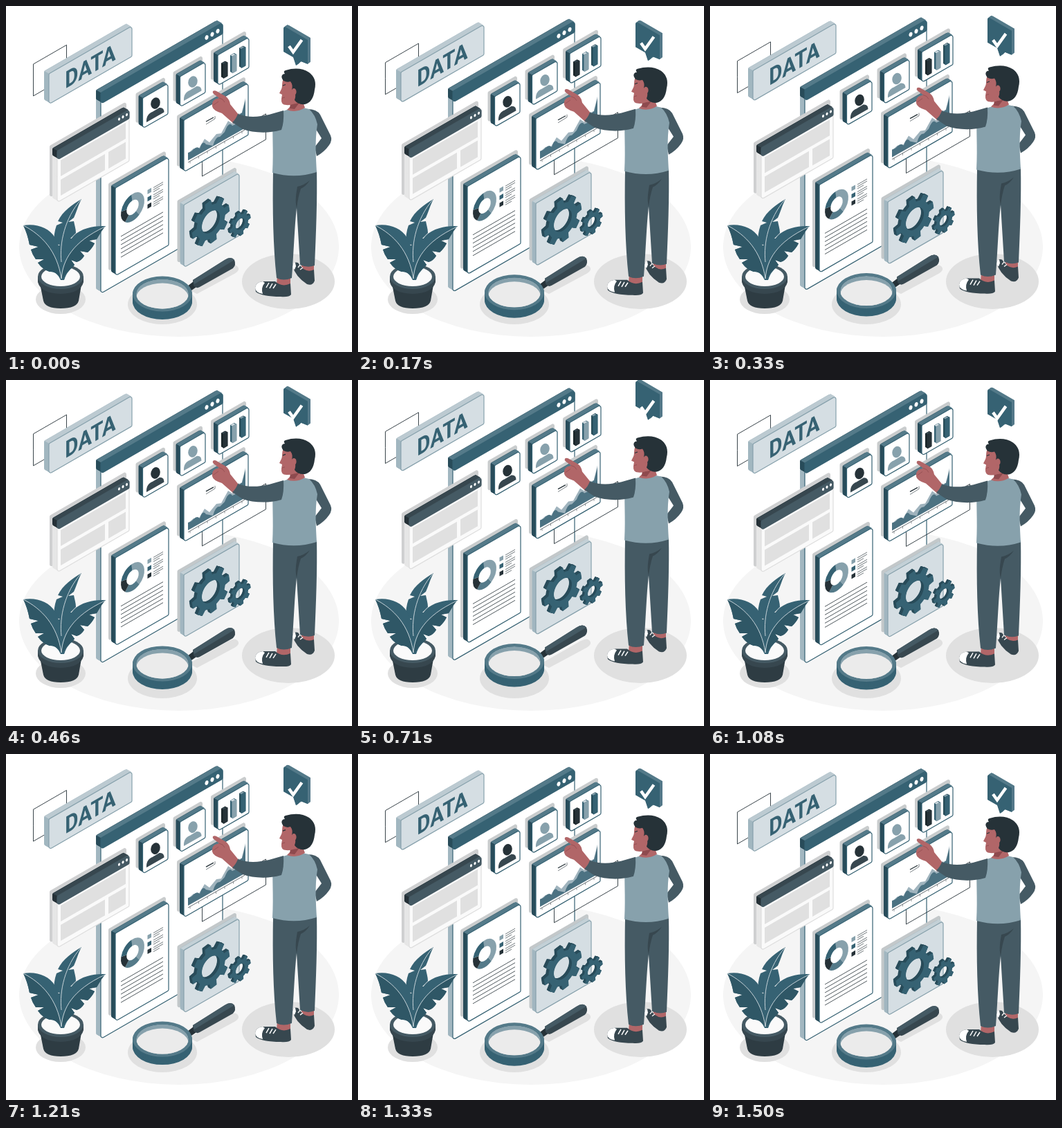
An HTML page with a canvas for the animation above (1.54 s loop, 500x500 px).

```html
<!DOCTYPE html>
<html lang="en">
<head>
<meta charset="utf-8">
<title>Data dashboard</title>
<style>
html, body { margin: 0; width: 100%; height: 100%; overflow: hidden; background: #fff; }
canvas { display: block; width: 100vw; height: 100vh; }
</style>
</head>
<body>
<canvas id="stage" width="500" height="500"></canvas>
<script>
const ctx = document.getElementById('stage').getContext('2d');
const SLOPE = 0.577;
const TEAL = '#366273', DEEP = '#294c5a', MID = '#547a89', SOFT = '#87a1ac', PALE = '#d5dee3';
const INK = '#263238', SLATE = '#37474f', STEEL = '#455a64', SKIN = '#b16668', SHADE = '#e0e0e0';

function fill(color, d) {
  ctx.fillStyle = color;
  ctx.fill(typeof d === 'string' ? new Path2D(d) : d, 'evenodd');
}
function line(color, width, d) {
  ctx.strokeStyle = color;
  ctx.lineWidth = width;
  ctx.stroke(typeof d === 'string' ? new Path2D(d) : d);
}
function oval(color, x, y, rx, ry, turn = 0) {
  ctx.fillStyle = color;
  ctx.beginPath();
  ctx.ellipse(x, y, rx, ry, turn, 0, Math.PI * 2);
  ctx.fill();
}
// Upright parallelogram rising to the right, with rounded corners
function quad(x, y, w, h, r = 0) {
  const path = new Path2D(), rise = w * SLOPE;
  const corners = [[x, y], [x + w, y - rise], [x + w, y - rise + h], [x, y + h]];
  path.moveTo(x, y + h / 2);
  corners.forEach((c, i) => path.arcTo(...c, ...corners[(i + 1) % 4], r));
  path.closePath();
  return path;
}
function lifted(dy, draw) {
  ctx.save();
  ctx.translate(0, dy);
  draw();
  ctx.restore();
}
// Solid made by sweeping a flat outline along (dx, dy)
function extrude(path, dx, dy, side, face) {
  const steps = 12;
  for (let i = steps; i > 0; i--) {
    ctx.save();
    ctx.translate(dx * i / steps, dy * i / steps);
    fill(side, path);
    ctx.restore();
  }
  fill(face, path);
}
function slab(x, y, w, h, d, look) {
  const k = d * SLOPE, r = Math.min(2.5, w / 12);
  if (look.shadow) fill(look.shadow, quad(x - d - 4, y - k - 3, w + d, h, r));
  const face = quad(x, y, w, h, r);
  extrude(face, -d, -k, look.side, look.side);
  fill(look.top, `M${x + 0.5} ${y}l${-d} ${-k}l${w - 1.5} ${-(w - 1.5) * SLOPE}l${d} ${k}z`);
  fill(look.face, face);
  line(look.edge || look.face, 1.2, face);
}
const CARD = { side: DEEP, top: MID, face: '#fff', edge: TEAL, shadow: '#c9cccd' };

function floor() {
  oval('#f5f5f5', 250, 348, 231, 130);
  oval(SHADE, 408, 398, 67, 40);
  oval(SHADE, 79, 424, 36, 21);
  oval(SHADE, 226, 431, 50, 29);
  fill(SHADE, 'M264 410L322 377Q333 371 336 379Q337 383 330 387L276 416z');
}

function mainWindow() {
  slab(137, 126, 176, 289.5, 7, { side: '#a2b7c0', top: SOFT, face: '#fff', edge: TEAL });
  slab(137, 125.5, 176, 16, 7, { side: DEEP, top: MID, face: TEAL });
  for (let i = 0; i < 3; i++) oval('#fff', 290 + 8 * i, 45.5 - 4.6 * i, 2.4, 3.4, 0.3);
}

function sign() {
  line(INK, 0.9, quad(39.5, 84, 48, 46));
  slab(62, 98, 120, 44, 7, { side: '#a2b7c0', top: '#bccad1', face: PALE, edge: SOFT });
  ctx.save();
  ctx.transform(0.866, -0.5, 0, 1, 122, 98.5);
  ctx.font = '700 34px Roboto, sans-serif';
  ctx.textAlign = 'center';
  ctx.fillStyle = TEAL;
  ctx.fillText('DATA', 0, 0);
  ctx.restore();
}

function browser() {
  slab(74, 209, 104, 75, 7,
    { side: '#e6e6e6', top: '#eee', face: '#fafafa', edge: '#dedede', shadow: '#cfd0d1' });
  slab(74, 209.5, 104, 13, 7, { side: INK, top: SLATE, face: STEEL });
  for (let i = 0; i < 3; i++) oval('#fff', 163.5 + 5.5 * i, 163.5 - 3.2 * i, 1.5, 2.2, 0.3);
  fill(SHADE, quad(79, 223, 94, 23));
  fill(SHADE, quad(79, 251, 64, 23));
  fill(SHADE, quad(148, 211, 25, 24));
}

function profile(x, y, body, head) {
  slab(x, y, 36.5, 44, 6, CARD);
  ctx.save();
  ctx.translate(x, y);
  fill(body, 'M5.5 35C5 26 9 22 14 20L24 14Q31 13 31 20.5L5.5 35z');
  oval(head, 18.5, 7.5, 6.6, 8.4, 0.3);
  ctx.restore();
}

function barCard() {
  slab(306, 71, 45, 44, 6, CARD);
  [[20, INK, '#1b2529', SLATE], [24, SOFT, TEAL, PALE], [27, TEAL, DEEP, SOFT]].forEach(([h, face, side, top], i) => {
    slab(314 + 13 * i, 104.5 - 7.5 * i - h, 6, h, 3, { face, side, top });
  });
}

function chartCard() {
  line(INK, 0.9, quad(283.5, 209, 92, 37));
  slab(257, 165, 93, 75, 6, CARD);
  fill('#9fb3bd', 'M263 223V213L271 206L278 207L287 192L294 197L304 185L311 184L321 166L327 170L336 155L340 157L346 133V176z');
  fill('#4c7282', 'M263 223V212Q268 211 271 207Q276 202 280 206Q284 193 289 200L299 202Q303 188 309 189L316 182Q322 166 327 173L334 170Q338 152 341 155L346 136V176z');
  line(INK, 0.7, 'M263 226L345 179');
  for (let i = 0; i < 7; i++) line(INK, 0.5, `M${266 + i * 12.5} ${224.5 - i * 7.2}v3`);
  line(INK, 1.3, 'M289 167L300 161');
  line(INK, 0.6, 'M289 171L302 163V159');
}

function documentCard() {
  slab(158, 263, 77, 127, 6, CARD);
  ctx.save();
  ctx.transform(0.866, -0.5, 0, 1, 183, 291);
  [[-95, 55, SOFT], [55, 130, MID], [130, 190, INK], [190, 265, TEAL]].forEach(([from, to, color]) => {
    ctx.beginPath();
    ctx.arc(0, 0, 14.8, from * Math.PI / 180, to * Math.PI / 180);
    ctx.strokeStyle = color;
    ctx.lineWidth = 9.5;
    ctx.stroke();
  });
  ctx.restore();
  [SOFT, TEAL, INK].forEach((color, i) => {
    const y = 266 + 10.5 * i;
    fill(color, quad(204.5, y, 5.5, 6));
    for (let j = 0; j < 3; j++) {
      const w = j < 2 ? 14 : 9;
      line(INK, 0.65, `M213 ${y - 3.5 + j * 3}l${w} ${-w * SLOPE}`);
    }
  });
  for (let i = 0; i < 6; i++) line(INK, 0.8, `M166 ${333 + i * 6}l61 ${-61 * SLOPE}`);
}

function gear(cx, cy, radius, hole, depth) {
  const teeth = 8, path = new Path2D();
  const at = (r, a) => [cx + 0.866 * r * Math.cos(a), cy + r * Math.sin(a) - 0.5 * r * Math.cos(a)];
  for (let i = 0; i < teeth; i++) {
    const a = (i + 0.8) * Math.PI * 2 / teeth;
    [[0.76, -0.24], [1, -0.16], [1, 0.16], [0.76, 0.24], [0.76, 0.39]].forEach(([r, da]) => path.lineTo(...at(r * radius, a + da)));
  }
  path.closePath();
  for (let i = 0; i <= 40; i++) {
    const p = at(hole, i * Math.PI / 20);
    i ? path.lineTo(...p) : path.moveTo(...p);
  }
  path.closePath();
  extrude(path, -depth, -depth * SLOPE, DEEP, TEAL);
}

function gearCard() {
  slab(257, 287.5, 80, 90.5, 5.5, { side: '#a2b7c0', top: '#c3d0d6', face: PALE, edge: SOFT, shadow: '#c3c8ca' });
  gear(296, 312, 31.5, 15, 4);
  gear(338.5, 315, 17.5, 7.5, 3);
}

function magnifier() {
  const hole = new Path2D(), ring = new Path2D();
  hole.ellipse(226, 416, 38, 21.5, 0, 0, Math.PI * 2);
  ring.ellipse(226, 416, 43, 25.5, 0, 0, Math.PI * 2);
  ring.closePath();
  ring.addPath(hole);
  fill(INK, 'M262 405L271 398L278 404L268 411z');
  fill(SLATE, 'M270 396L316 367Q325 361 330 367Q333 374 328 379L280 406Q275 409 271 404z');
  fill(STEEL, 'M270 396L316 367Q325 361 330 367L272 402z');
  extrude(ring, 0, 11.5, TEAL, MID);
  ctx.save();
  ctx.clip(hole);
  fill(SOFT, hole);
  oval('#ebebeb', 226, 422, 38, 21.5);
  ctx.restore();
}

function plant() {
  const shadow = '#2f5766';
  fill('#2e3c43', 'M47 391L54 426Q57 437 79 437Q102 437 105 426L111 391z');
  fill(SLATE, 'M46 391V399Q50 415 79 416Q108 415 112 399V391z');
  oval(STEEL, 79, 391, 33, 18);
  oval('#fafafa', 79, 391, 28, 14);
  fill(TEAL, 'M78 394C74 376 70 362 70 350L78 345L69 344C69 334 70 325 73 317L82 313L75 311C82 296 96 287 109 279C104 289 102 297 98 306L90 312L98 311C99 317 101 322 101 328L93 336L100 336C98 352 92 377 84 395z');
  fill(TEAL, 'M79 396C76 389 71 383 63 384Q53 381 46 371L55 366L43 366Q38 359 36 352L47 348L34 345Q31 329 25 317C44 314 62 320 71 335C80 350 82 377 80 396z');
  fill(TEAL, 'M80 396C78 375 82 346 101 329C115 319 130 318 144 318C138 324 135 331 131 337L120 339L128 343Q124 351 118 356L107 354L113 361Q109 368 102 370L94 367L99 374C94 380 87 385 84 396z');
  fill(shadow, 'M80 394C74 354 52 331 25 317Q31 329 34 345L47 348L36 352Q38 359 43 366L55 366L46 371Q53 381 63 384C71 383 76 389 80 394z');
  fill(shadow, 'M81 394C83 367 96 341 144 318C138 324 135 331 131 337L120 339L128 343Q124 351 118 356L107 354L113 361Q109 368 102 370L94 367L99 374C94 380 87 385 81 394z');
  line(PALE, 0.9, 'M25 317C52 331 74 354 80 394M80 394C82 367 96 341 143 319M80 370C77 342 85 307 108 280');
}

function man() {
  // shoes and ankles
  fill(SKIN, 'M392 390H411V404Q400 408 391 402zM426 370H445V388L429 386z');
  fill(SLATE, 'M414 375Q416 369 422 371Q432 387 445 381L446 397Q443 405 435 402Q418 391 414 375z');
  fill('#fff', 'M414 376Q415 370 418 371L419 376L417 381Q414 379 414 376z');
  line('#fff', 1.3, 'M422 378L425 374M425 381L429 378');
  fill(SLATE, 'M360 407Q361 399 371 398L389 398Q399 407 411 401L412 417Q409 421 397 420Q370 420 361 413z');
  fill('#fff', 'M360 407Q361 399 371 398L374 400Q368 407 371 416Q360 414 360 407z');
  line('#fff', 1.5, 'M376 407L380 400M381 408L385 401M386 408L390 402');
  // legs
  fill(STEEL, 'M386 238H449C450 278 448 330 446 375Q436 379 425 374L420 292C417 317 416 353 413 393Q401 398 391 393C386 347 385 295 386 238z');
  fill(SLATE, 'M420 292C417 281 420 268 421 261Q431 259 439 252Q433 261 426 264Q422 276 420 292z');
  // far arm and body
  fill(STEEL, 'M436 149Q449 149 454 157L469 187Q472 194 467 201Q460 211 449 217L446 204L456 191L444 172z');
  fill(SOFT, 'M400 152Q423 144 438 149Q447 157 450 171C446 195 448 220 449 240Q418 250 385 241C387 208 384 180 386 158z');
  // pointing arm
  fill(SKIN, 'M299 123Q302 121 306 124L318 131Q323 135 324 142L337 158L329 170L312 155Q299 151 298 145Q297 138 302 135L308 133L300 127Q298 125 299 123z');
  line('#8e4a4e', 0.7, 'M308 133Q314 134 316 139M300 143L307 138');
  fill(STEEL, 'M335 156C351 162 366 160 380 157L401 151Q402 168 398 179C377 185 357 183 342 178L327 168Q332 164 335 156z');
  // head
  fill(SKIN, 'M409 132L426 130L432 147Q419 155 406 150L411 145z');
  fill('#8e4a4e', 'M411 141Q420 143 426 137L417 149L410 148z');
  fill(SKIN, 'M401 105C398 111 400 116 398 120L395 126L399 128L398 134Q397 143 405 143Q415 144 423 137L426 115L417 104z');
  fill(INK, 'M401 108Q397 103 399 100Q400 98 403 98Q400 94 404 93Q424 87 438 96Q450 105 446 121Q444 139 432 142Q422 143 417 136Q420 128 416 124L413 121Q415 114 411 109Q406 111 401 108z');
  oval(SKIN, 416, 124, 3.6, 5);
  line(INK, 1.2, 'M400 115L404 113.5');
  line('#8e4a4e', 0.8, 'M399 133L403 132');
}

function bubble() {
  const shape = new Path2D('M401 33Q401 29 405 31L436 49V84L426 80L419 86L415 74L401 66z');
  extrude(shape, 4, -3, MID, TEAL);
}

function render(now) {
  // 24 pictures a second; a linear rise and fall within 36 steps
  const step = Math.floor(((now % 1540) + 5) / (1000 / 24));
  const rise = 1 - Math.abs(Math.min(step, 36) - 18) / 18;
  ctx.fillStyle = '#fff';
  ctx.fillRect(0, 0, 500, 500);
  ctx.lineJoin = 'round';
  floor();
  lifted(-10 * rise, () => {
    mainWindow();
    sign();
    browser();
    profile(197.5, 133, SLATE, INK);
    profile(251.5, 102, SOFT, SOFT);
    barCard();
    chartCard();
    documentCard();
    gearCard();
    magnifier();
  });
  plant();
  lifted(-10 * rise, man);
  lifted(-30 * rise, bubble);
  lifted(-20 * rise, () => {
    ctx.lineJoin = 'miter';
    line('#fff', 4.4, 'M409 58L415 66.5L427.5 49');
  });
}

const start = performance.now();
function tick() {
  render(performance.now() - start);
  requestAnimationFrame(tick);
}
tick();
</script>
</body>
</html>
```
